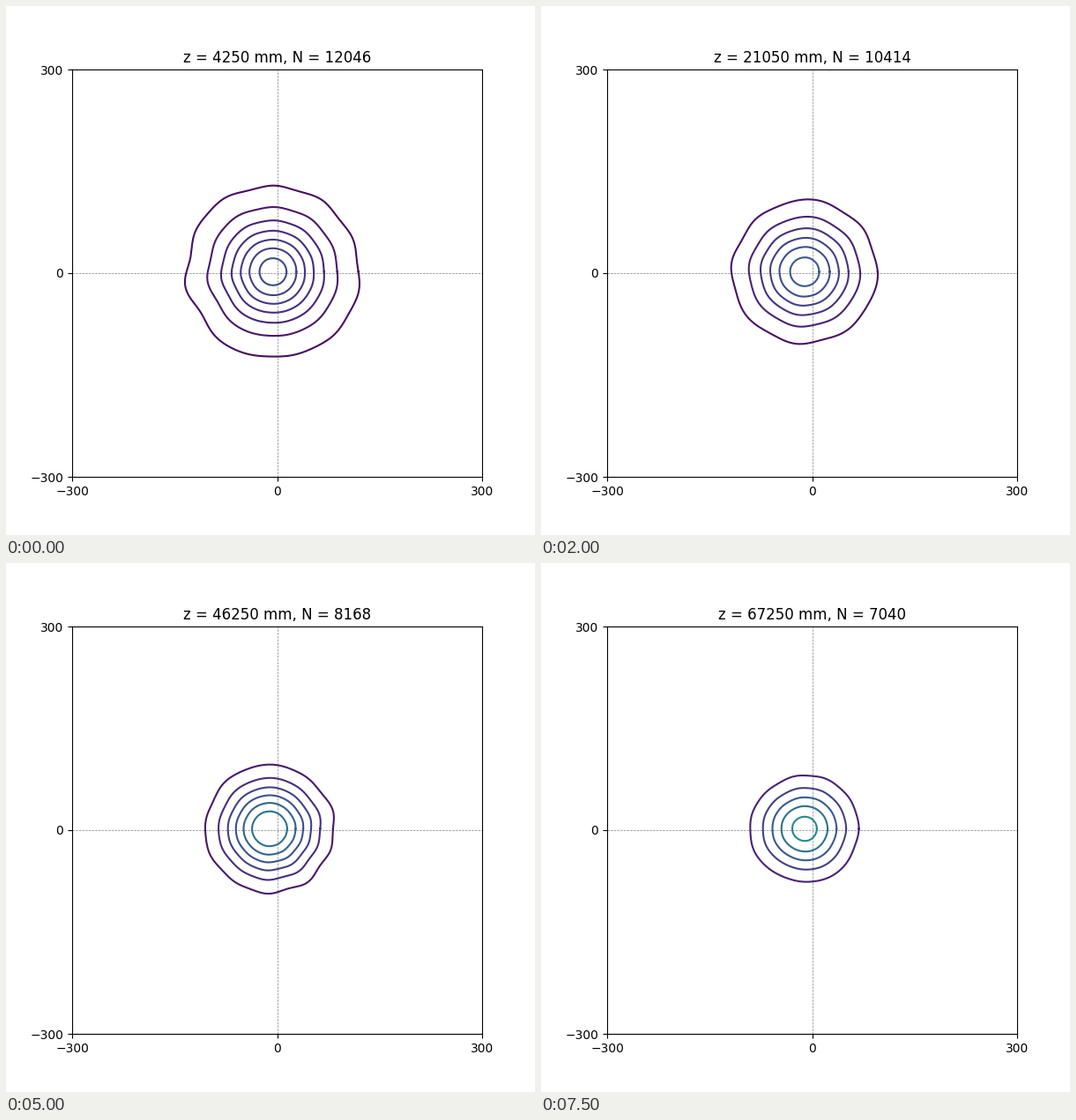
A matplotlib script for the animation above (8 s loop, 600 by 600 pixels).

```python
import numpy as np
import matplotlib.pyplot as plt
from matplotlib.animation import FuncAnimation

FRAMES, INTERVAL = 16, 500
TOP = 32                        # density at the top of the colour map
STEPS = (1, 1.5, 2, 3)          # allowed contour spacings
MAX_RINGS = 8

# Beam size and peak density at a few positions along the line.
KEYS = [0, 1, 2, 4, 6, 8, 11, 15]
COUNTS = [12046, 11600, 11171, 10414, 9511, 8777, 7863, 7040]
PEAKS = [7.6, 7.95, 9.6, 9.9, 11.2, 12.8, 14.6, 16.4]

theta = np.linspace(0, 2 * np.pi, 241)
lobes = np.arange(2, 12)[:, None]


def radius_sq(i, level, peak):
    """Squared contour radius in pixels: a Gaussian core with a fading tail."""
    x = np.log(peak / level)
    spread = 2470 - 330 * np.tanh((i - 10.5) / 2.5)
    tail = 0.34 * np.exp(-i / 4.5)
    return spread * x * (1 + tail * x)


def wobble(i, n, radius):
    """Uneven outline: fine lobes on the outside, smoother inside."""
    rng = np.random.default_rng(100 + i)
    amp = 0.008 * rng.normal(size=lobes.shape) * (radius / 100) ** (lobes / 6)
    phase = rng.uniform(0, 2 * np.pi, lobes.shape) + 0.2 * n
    return 1 + (amp * np.sin(lobes * theta + phase)).sum(axis=0)


fig = plt.figure(figsize=(6, 6), dpi=100)
ax = fig.add_axes([0.125, 0.11, 0.775, 0.77])
ax.set(xlim=(-300, 300), ylim=(-300, 300),
       xticks=(-300, 0, 300), yticks=(-300, 0, 300))
ax.axhline(0, color="gray", ls="--", lw=0.5)
ax.axvline(0, color="gray", ls="--", lw=0.5)
title = ax.set_title("")
rings = [ax.plot([], [], lw=1.5)[0] for _ in range(MAX_RINGS)]
MM = 600 / 465                  # millimetres per pixel


def draw(i):
    count = round(np.interp(i, KEYS, COUNTS))
    title.set_text(f"z = {4250 + 4200 * i} mm, N = {count}")

    peak = np.interp(i, KEYS, PEAKS)
    step = next(s for s in STEPS if peak / s < MAX_RINGS)
    x0, y0 = -11 + 5 * np.exp(-i), 2
    for n, ring in enumerate(rings, 1):
        level = n * step
        if level >= peak:
            ring.set_data([], [])
            continue
        radius = np.sqrt(radius_sq(i, level, peak))
        r = MM * radius * wobble(i, n, radius)
        ring.set_data(x0 + r * np.cos(theta), y0 + r * np.sin(theta))
        ring.set_color(plt.cm.viridis(level / TOP))
    return [title, *rings]


anim = FuncAnimation(fig, draw, frames=FRAMES, interval=INTERVAL,
                     repeat=True, repeat_delay=0, blit=False)
plt.show()
```
